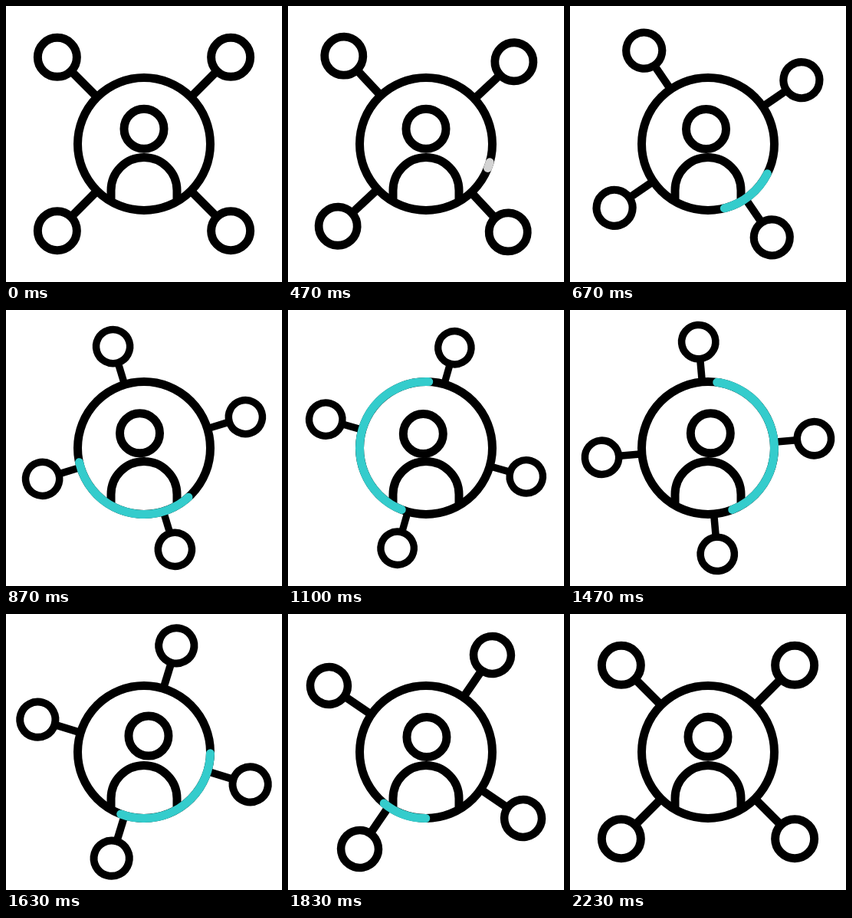
Recreate the animation shown at these times as an HTML page with a canvas. Size 360x360 px, loop 2500 ms.

```html
<!DOCTYPE html>
<html lang="en">
<head>
<meta charset="utf-8">
<title>Network hub</title>
<style>
html, body { margin: 0; width: 100%; height: 100%; overflow: hidden; background: #fff; }
canvas { display: block; width: 360px; height: 360px; }
</style>
</head>
<body>
<canvas id="stage"></canvas>
<script>
const LOOP = 2500, STEP = 100 / 3, C = 180, RING = 86.5, LINE = 11;
const BLACK = '#000', TEAL = '#34cccc', GREY = '#d3d3d3';

const canvas = document.getElementById('stage');
const ctx = canvas.getContext('2d');
const dpr = window.devicePixelRatio || 1;
canvas.width = canvas.height = 360 * dpr;

const rad = deg => deg * Math.PI / 180;
const span = (t, a, b) => Math.min(1, Math.max(0, (t - a) / (b - a)));
const smooth = u => u * u * (3 - 2 * u);
const easeInOut = (u, n) =>
  u < 0.5 ? (2 * u) ** n / 2 : 1 - (2 - 2 * u) ** n / 2;

// Monotone cubic curve through [time, value] keys, flat at both ends
function track(keys) {
  const last = keys.length - 1;
  const rate = i => (keys[i + 1][1] - keys[i][1]) / (keys[i + 1][0] - keys[i][0]);
  const tan = keys.map((k, i) => {
    if (i === 0 || i === last) return 0;
    const a = rate(i - 1), b = rate(i);
    return a * b > 0 ? 2 * a * b / (a + b) : 0;
  });
  return t => {
    if (t <= keys[0][0]) return keys[0][1];
    if (t >= keys[last][0]) return keys[last][1];
    let i = 0;
    while (t >= keys[i + 1][0]) i++;
    const [t0, v0] = keys[i], [t1, v1] = keys[i + 1];
    const d = t1 - t0, u = (t - t0) / d, w = 1 - u;
    return v0 + (v1 - v0) * smooth(u) + d * u * w * (w * tan[i] - u * tan[i + 1]);
  };
}

// Arc ends in degrees, relative to the spinning hub
const arcTail = track([[430, 13.8], [470, 14], [870, 20], [1330, 105.6],
  [1630, 208], [1830, 280], [2050, 320]]);
const arcHead = track([[430, 14], [470, 20], [670, 66], [870, 140.6],
  [1330, 269.4], [1630, 318.5], [1830, 320]]);
const headX = track([[480, 0], [880, -5.5], [1330, 0], [1620, 6], [1830, 1], [1930, 0]]);
const headY = track([[480, 0], [870, 0.5], [1330, 1.8], [1630, -1.2], [1830, 0.2], [1930, 0]]);

const spin = t => 180 * easeInOut(span(t, 280, 2220), 2.32);
const scale = t =>
  1 - 0.15 * (smooth(span(t, 320, 1000)) - smooth(span(t, 1280, 2130)));

function arc(x, y, r, from = 0, to = 360) {
  ctx.beginPath();
  ctx.arc(x, y, r, rad(from), rad(to));
  ctx.stroke();
}

function drawNodes(angle, s) {
  ctx.lineWidth = LINE * s;
  for (let i = 0; i < 4; i++) {
    ctx.save();
    ctx.translate(C, C);
    ctx.rotate(rad(angle + 45 + 90 * i));
    arc(160 * s, 0, 25.5 * s);
    ctx.beginPath();
    ctx.moveTo(RING, 0);
    ctx.lineTo(133 * s, 0);
    ctx.stroke();
    ctx.restore();
  }
}

function drawPerson(dx, dy) {
  ctx.lineWidth = LINE;
  arc(C + dx, 160.3 + dy, 26);
  ctx.beginPath();
  ctx.moveTo(137, 252);
  ctx.lineTo(137, 240.5);
  ctx.arc(C, 240.5, 43, Math.PI, 0);
  ctx.lineTo(223, 252);
  ctx.stroke();
}

function draw(t) {
  ctx.setTransform(dpr, 0, 0, dpr, 0, 0);
  ctx.fillStyle = '#fff';
  ctx.fillRect(0, 0, 360, 360);
  ctx.strokeStyle = BLACK;
  ctx.lineCap = 'butt';

  const angle = spin(t);
  drawNodes(angle, scale(t));
  drawPerson(headX(t), headY(t));
  arc(C, C, RING);

  const from = arcTail(t), to = arcHead(t);
  if (to - from > 0.5) {
    ctx.strokeStyle = t < 490 ? GREY : TEAL;
    ctx.lineCap = 'round';
    arc(C, C, RING, angle + from, angle + to);
  }
}

const start = performance.now();
function tick() {
  const t = (performance.now() - start) % LOOP;
  draw(Math.floor((t + 5) / STEP) * STEP % LOOP);
  requestAnimationFrame(tick);
}
tick();
</script>
</body>
</html>
```
